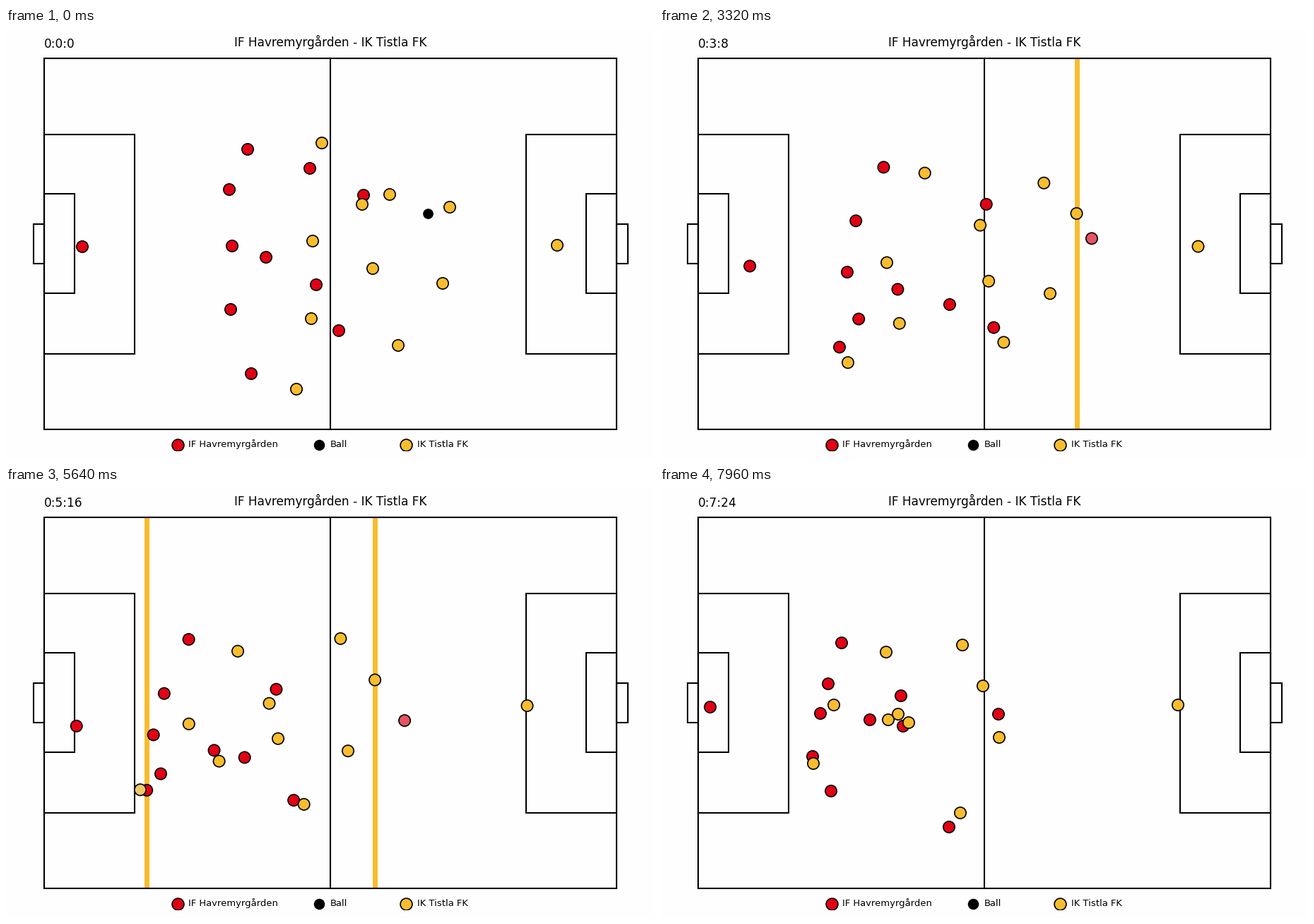
Recreate the animation shown at these times as a matplotlib script. Size 917 px wide and 611 px high, loop 8000 ms.

```python
import numpy as np
import matplotlib.pyplot as plt
from matplotlib.animation import FuncAnimation
from matplotlib.patches import Rectangle

W, H, DPI = 917, 611, 100
PT = 72 / DPI  # points per pixel
FPS, FRAMES = 25, 200
HOME, AWAY = "IF Havremyrgården", "IK Tistla FK"
RED, GOLD, BG = "#e30015", "#f8bd2e", "#fefefe"
PALE_RED, PALE_GOLD = "#e65361", "#f0c869"
LEFT, RIGHT, TOP, BOTTOM, MID = 54, 864, 43.2, 568.8, 459
LINE = 2.08 * PT
TURN = 0.513  # part of the loop at which the players pass their middle point
BALL, BALL_FRAMES = (597, 263), 5

plt.rcParams["font.family"] = "DejaVu Sans"


class Group:
    """Players with start, middle and end points and a common sideways sway."""

    def __init__(self, sway, *players):
        self.sway = sway
        self.start, self.mid, self.end = np.array(players, float).swapaxes(0, 1)

    def at(self, u):
        m = TURN
        pos = (self.start * (u - m) * (u - 1) / m
               + self.mid * u * (1 - u) / (m * (1 - m))
               + self.end * u * (u - m) / (1 - m))
        wave = 21 * u * (1 - u) * (m - u)
        lag = 0.35 * wave * np.cos(np.pi * u / 2) ** 2
        pos[:, 0] += self.sway * wave
        pos[:, 1] -= lag * (self.mid - self.start)[:, 1]
        return pos


red_team = [
    Group(9, [(108, 310), (120, 342), (71, 312)]),
    Group(25,
          [(342, 172), (296, 206), (257, 221)],
          [(316, 229), (257, 285), (238, 279)],
          [(320, 309), (243, 353), (227, 321)],
          [(318, 399), (259, 413), (216, 382)],
          [(347, 490), (230, 441), (242, 431)]),
    Group(17,
          [(368, 325), (321, 378), (297, 330)],
          [(506, 237), (603, 316), (479, 322)]),
    Group(34,
          [(430, 199), (438, 267), (341, 296)],
          [(439, 364), (384, 394), (344, 339)],
          [(471, 429), (450, 429), (409, 482)]),
]
gold_team = [
    Group(8, [(780, 308), (753, 310), (733, 309)]),
    Group(23,
          [(543, 236), (522, 216), (428, 224)],
          [(618, 362), (527, 378), (480, 355)],
          [(555, 450), (462, 446), (425, 462)],
          [(504, 250), (426, 291), (337, 322)],
          [(519, 341), (438, 361), (352, 334)],
          [(411, 512), (234, 457), (217, 392)]),
    Group(10,
          [(628, 254), (569, 267), (457, 282)],
          [(447, 163), (357, 219), (320, 234)],
          [(434, 302), (297, 338), (246, 309)],
          [(432, 412), (322, 412), (323, 330)]),
]


def positions(team, frame):
    return np.vstack([group.at(frame / (FRAMES - 1)) for group in team])


fig = plt.figure(figsize=(W / DPI, H / DPI), dpi=DPI, facecolor=BG)
ax = fig.add_axes([0, 0, 1, 1])
ax.set(xlim=(0, W), ylim=(H, 0))
ax.axis("off")


def box(x0, y0, x1, y1):
    ax.add_patch(Rectangle((x0, y0), x1 - x0, y1 - y0, fill=False,
                           ec="black", lw=LINE, zorder=2))


def dots(xy, color, size=16.3, z=3):
    x, y = np.transpose(xy)
    return ax.scatter(x, y, s=(size * PT) ** 2, c=color, edgecolors="black",
                      linewidths=1.7 * PT, zorder=z)


def label(x, y, text, px, ha="left"):
    return ax.text(x, y, text, fontsize=px * PT, ha=ha, va="baseline")


box(LEFT, TOP, RIGHT, BOTTOM)
ax.plot([MID, MID], [TOP, BOTTOM], color="black", lw=LINE, zorder=2)
# Penalty area, goal area and goal at both ends
for depth, y0, y1 in [(128, 150.6, 461.6), (42.8, 235.3, 376.4), (-15.5, 277.7, 334.3)]:
    box(LEFT, y0, LEFT + depth, y1)
    box(RIGHT - depth, y0, RIGHT, y1)

label(MID, 25.5, f"{HOME} - {AWAY}", 17, "center")
clock = label(53.7, 28.2, "", 17)

legend_clip = Rectangle((0, 570), W, 29.2, transform=ax.transData)
for x, color, size, text in [(242.8, RED, 16.8, HOME), (442.9, "black", 13.8, "Ball"),
                             (566.2, GOLD, 16.8, AWAY)]:
    dots([(x, 591.2)], color, size).set_clip_path(legend_clip)
    label(x + 15.4, 594.4, text, 13.15)

limits = [ax.plot([0, 0], [TOP, BOTTOM], color=GOLD, lw=7 * PT, zorder=1,
                  solid_capstyle="butt")[0] for _ in range(2)]
reds = dots(positions(red_team, 0), RED, z=4)
golds = dots(positions(gold_team, 0), GOLD, z=5)
ball = dots([BALL], "black", 13, z=6)


def mark_offside(line, x, offside, players, color, pale):
    line.set_xdata([x, x])
    line.set_visible(bool(offside.any()))
    players.set_facecolor([pale if off else color for off in offside])


def update(frame):
    red, gold = positions(red_team, frame), positions(gold_team, frame)
    reds.set_offsets(red)
    golds.set_offsets(gold)
    ball.set_visible(frame < BALL_FRAMES)
    clock.set_text(f"0:{frame // FPS}:{frame % FPS}")

    # The second-last defender sets the offside limit
    right = max(np.sort(gold[:, 0])[-2], MID)
    left = min(np.sort(red[:, 0])[1], MID)
    mark_offside(limits[0], right, red[:, 0] > right, reds, RED, PALE_RED)
    mark_offside(limits[1], left, gold[:, 0] < left, golds, GOLD, PALE_GOLD)
    return [reds, golds, ball, clock, *limits]


anim = FuncAnimation(fig, update, frames=FRAMES, interval=1000 / FPS,
                     repeat=True, repeat_delay=0, blit=False)
plt.show()
```
